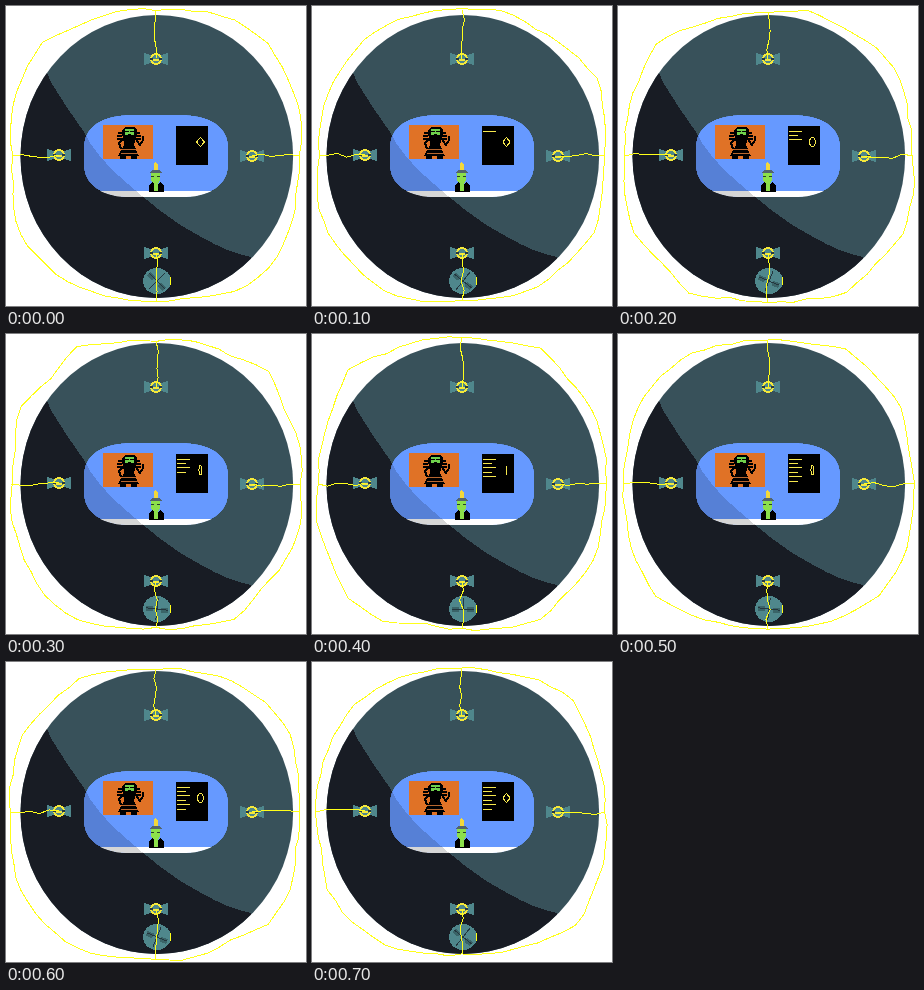
Write an HTML page that moves like this. It is 300 px wide and 300 px high and loops after 0.8 s.

```html
<!DOCTYPE html>
<html lang="en">
<head>
<meta charset="utf-8">
<title>Electric disc</title>
<style>
html, body { margin: 0; width: 100%; height: 100%; overflow: hidden; background: #fff; }
svg { display: block; width: 100vw; height: 100vh; }
</style>
</head>
<body>
<svg viewBox="0 0 300 300" shape-rendering="crispEdges">
  <defs>
    <clipPath id="disc"><ellipse cx="150.8" cy="150.5" rx="136.3" ry="141.5"/></clipPath>
    <path id="pane" d="M120 109H180C206 110 220 122 222 137V163C220 178 206 190 180 191H120C94 190 80 178 78 163V137C80 122 94 110 120 109Z"/>
    <clipPath id="window"><use href="#pane"/></clipPath>
    <path id="shade" d="M41 67L46 78C56 94 67 111 78 126C86 143 99 157 113 170C141 195 167 217 197 232C213 241 229 248 245 251L240 300H0V67Z"/>
    <g id="emitter">
      <path d="M-12-6L-5-4H5L12-6V6L5 4H-5L-12 6Z" fill="#4f878c"/>
      <circle r="5" fill="#4f878c" stroke="#f4e83a" stroke-width="2"/>
      <path d="M-6-1H-3V1H-6ZM3-1H6V1H3Z" fill="#26383f"/>
      <path d="M-3 0H3V2H-3Z" fill="#f4e83a"/>
    </g>
  </defs>

  <g clip-path="url(#disc)">
    <rect width="300" height="300" fill="#38515a"/>
    <use href="#shade" fill="#181c24"/>
  </g>
  <g clip-path="url(#window)">
    <use href="#pane" fill="#6699ff"/>
    <rect x="78" y="185" width="144" height="7" fill="#fff"/>
    <use href="#shade" fill="#000" opacity=".16"/>
  </g>

  <rect x="97" y="119" width="50" height="34" fill="#e07226"/>
  <g>
    <path d="M116 130V124L119 121H128L131 124V130Z"/>
    <path d="M112 127h5m-6 3h5m-5 3h5M130 127h4m-4 3h5m-4 3h4" stroke="#000" stroke-width="2"/>
    <path d="M119 123H128V129H119Z" fill="#6fd14c"/>
    <path d="M119 125h4m1 0h4m-6 3h3" stroke="#000"/>
    <path d="M117 130H130L128 139L133 150H112L118 139Z"/>
    <path d="M118 132L113 137L115 143M129 132L134 139L137 134V130" fill="none" stroke="#000" stroke-width="2"/>
    <path d="M116 143h14m-15 4h17" stroke="#b8672f"/>
    <path d="M114 150h6v3h-6zM125 150h6v3h-6z"/>
  </g>

  <rect x="170" y="120" width="32" height="39"/>
  <path id="lines" fill="none" stroke="#f7e84d"/>
  <path id="coin" fill="none" stroke="#f7e84d"/>

  <g>
    <path d="M148 164V158L149 156H150L152 159V165Z" fill="#f2d83b"/>
    <path d="M143 167L147 164H153L156 167Z" fill="#53656c"/>
    <path d="M145 167H154V174L152 178H147L145 174Z" fill="#8ce04a"/>
    <path d="M143 179L146 176L149 179H151L154 176L158 179V186H143Z"/>
    <path d="M148 178H152V185H148Z" fill="#8ce04a"/>
    <path d="M145 170h3m3 0h3" stroke="#263d2c"/>
  </g>

  <use href="#emitter" x="150" y="53"/>
  <use href="#emitter" x="53" y="149"/>
  <use href="#emitter" x="246" y="150"/>
  <use href="#emitter" x="150" y="247"/>

  <g transform="translate(151 275)">
    <ellipse rx="14" ry="13" fill="#4f878c"/>
    <g id="wheel">
      <path d="M-11-2H-4V3H-11ZM4-2H11V3H4Z" fill="#3a6468"/>
      <path d="M-11 0H11M0-11V11" stroke="#24363e"/>
    </g>
    <path d="M13-4Q15 0 13 4" fill="none" stroke="#ffff19"/>
  </g>
  <path id="sparks" fill="none" stroke="#ffff19"/>
</svg>

<script>
const STEP = 100, STEPS = 8, KNOTS = 24, SUB = 3;
const $ = id => document.getElementById(id);
const emitters = [[150, 53], [246, 150], [150, 247], [53, 149]];

// Seeded value from -1 to 1.
function noise(n) {
  const v = Math.sin(n * 91.73 + 17.1) * 43758.5453;
  return (v - Math.floor(v)) * 2 - 1;
}

const mix = (a, b, f) => a + (b - a) * f;
const path = points => "M" + points.map(p => p.map(v => v.toFixed(1)).join(" ")).join("L");

function polar(turn, r) {
  const a = turn * Math.PI * 2;
  return [150 + r * Math.sin(a), 150 - r * Math.cos(a)];
}

// The ring bulges and wavers most at the diagonals.
function knotRadius(k, seed) {
  const bulge = Math.sin(k / KNOTS * Math.PI * 4) ** 2;
  return 145 + 10 * bulge + noise(seed * 50 + k) * (2.5 + 4 * bulge);
}

function ringPath(seed) {
  const points = [];
  for (let k = 0; k < KNOTS * SUB; k++) {
    const j = Math.floor(k / SUB), f = k % SUB / SUB;
    const r = mix(knotRadius(j, seed), knotRadius((j + 1) % KNOTS, seed), f);
    points.push(polar(k / KNOTS / SUB, r + noise(seed * 200 + k + 900)));
  }
  return path(points) + "Z";
}

// A bolt bends sideways at four points, then meets the ring.
function boltPath(side, seed) {
  const start = emitters[side];
  const end = polar(side / 4, knotRadius(side * KNOTS / 4, seed));
  const points = [start];
  for (let k = 1; k < 5; k++) {
    const bend = noise(seed * 30 + side * 7 + k + 500) * 2.5;
    const x = mix(start[0], end[0], k / 5), y = mix(start[1], end[1], k / 5);
    points.push(side % 2 ? [x, y + bend] : [x + bend, y]);
  }
  return path([...points, end]);
}

// Half a turn per loop: a diamond face on, an ellipse as it narrows.
function coinPath(turn) {
  const w = 4 * Math.abs(Math.cos(turn * Math.PI)), x = 194.5, y = 136, h = 4.5;
  if (w > 3.5) return path([[x, y - h], [x + w, y], [x, y + h], [x - w, y]]) + "Z";
  return `M${x} ${y - h}A${w} ${h} 0 0 1 ${x} ${y + h}A${w} ${h} 0 0 1 ${x} ${y - h}`;
}

function linesPath(count) {
  let d = "";
  for (let k = 0; k < count; k++) d += `M171 ${Math.floor(125 + k * 4.4) + 0.5}h${k % 2 ? 9 : 13}`;
  return d;
}

function draw(time) {
  const i = Math.floor(time / STEP) % STEPS, turn = i / STEPS;
  const bolts = emitters.map((_, side) => boltPath(side, i));
  $("sparks").setAttribute("d", ringPath(i) + bolts.join(""));
  $("coin").setAttribute("d", coinPath(turn));
  $("lines").setAttribute("d", linesPath(Math.min(6, Math.round(i * 1.3))));
  $("wheel").setAttribute("transform", `rotate(${22.5 * (1 + Math.cos(turn * Math.PI * 2))})`);
}

function tick() {
  draw(performance.now());
  requestAnimationFrame(tick);
}
tick();
</script>
</body>
</html>
```
